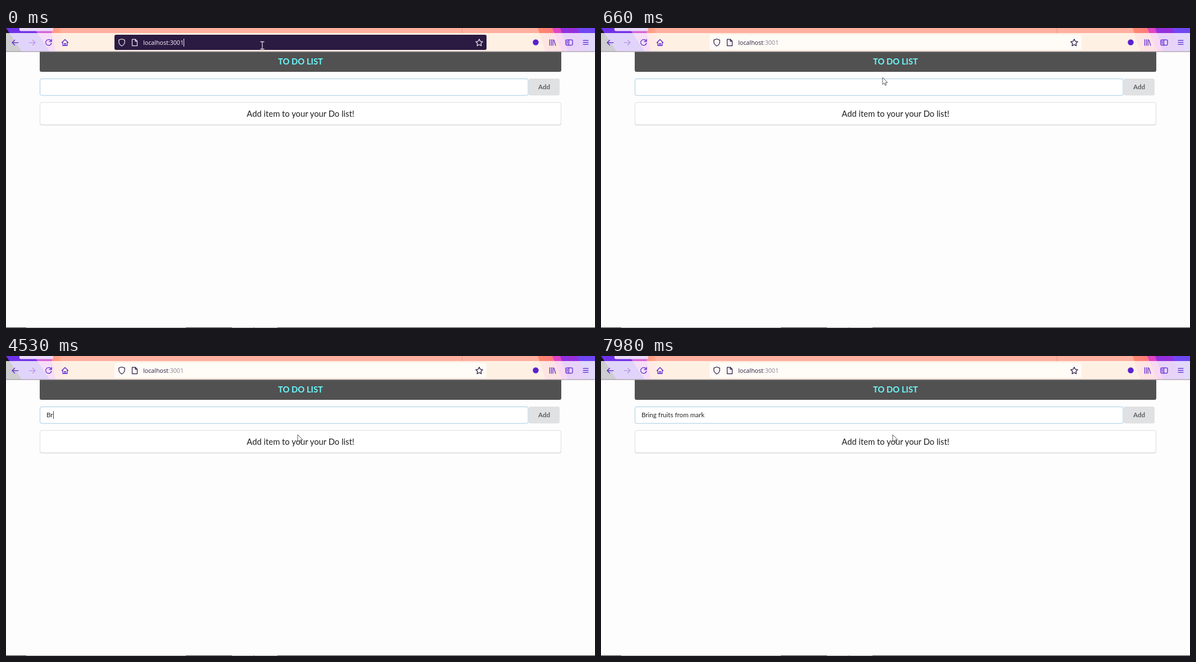
Write an HTML page that moves like this. It is 1048 by 534 pixels and loops after 8000 ms.

```html
<!DOCTYPE html>
<html lang="en">
<head>
<meta charset="utf-8">
<title>To do list</title>
<style>
  html, body { margin: 0; width: 100%; height: 100%; overflow: hidden; background: #fdfdfd; }
  svg { display: block; width: 1048px; height: 534px; font: 11.6px Lato, sans-serif; }
  text { white-space: pre; }
  .icon { fill: none; stroke: #5a22cf; stroke-width: 1.25; stroke-linecap: round; stroke-linejoin: round; }
  .big { font-size: 14.8px; }
  .bold { font-weight: 700; }
  .mid { text-anchor: middle; }
  .url { font: 10.7px "Open Sans", sans-serif; fill: #2b2040; }
  .port { fill: #8b8491; }
  #bar { fill: #fff; fill-opacity: .72; }
  #barIcons { stroke: #2b1b45; }
  .focused #bar { fill: #2b1a42; fill-opacity: 1; }
  .focused #barIcons { stroke: #e8e2ee; }
  .focused .url, .focused .port { fill: #fbfbfe; }
  #urlCaret, #status { visibility: hidden; }
  .focused #urlCaret, .loading #status { visibility: visible; }
  .loading #page { visibility: hidden; }
</style>
</head>
<body>
<svg id="stage" viewBox="0 0 1048 534">
  <defs>
    <linearGradient id="warm"><stop stop-color="#ff7f86"/><stop offset="1" stop-color="#ffb08a"/></linearGradient>
    <linearGradient id="hot"><stop stop-color="#ff8a6c"/><stop offset="1" stop-color="#f04fae"/></linearGradient>
  </defs>
  <rect width="1048" height="534" fill="#fdfdfd"/>

  <!-- Browser theme and toolbar -->
  <rect width="1048" height="9" fill="#ffb0a0"/>
  <rect y="9" width="1048" height="33" fill="#ffb780"/>
  <path d="M60 0H96L106 42H70Z" fill="url(#warm)"/>
  <path d="M0 0H80L88 42H0Z" fill="#d565d8"/>
  <path d="M0 0H50L78 42H0Z" fill="#7032e8"/>
  <path d="M0 0L28 42H0Z" fill="#17121f"/>
  <path d="M946 0H1048V42H960Z" fill="url(#hot)"/>
  <path d="M972 0H1048V42H990Z" fill="#e045c4"/>
  <path d="M986 0H1048V42H1000Z" fill="#9430dd"/>
  <path d="M1016 0H1048V42H1036Z" fill="#7048f2"/>
  <rect y="9" width="1048" height="33" fill="#fff" opacity=".79"/>
  <path d="M24 0H84V3Q84 5.500 81 5.500H27Q24 5.500 24 3Z" fill="#ead8fa"/>
  <path d="M811.500 0V9" stroke="#ef8f86"/>
  <path d="M0 42H1048" stroke="#96898f"/>

  <g class="icon">
    <path d="M22 26H11M15.500 21.500L11 26L15.500 30.500"/>
    <path d="M41 26H52M47.500 21.500L52 26L47.500 30.500" stroke="#b695ec"/>
    <path id="reload" d="M80.300 23A5.200 5.200 0 1 0 80.900 27M81 20V24H77"/>
    <path d="M99.500 26L105 20.500L110.500 26M101 25V31.300H109V25M103.700 31V27.500H106.300V31"/>
    <circle cx="942.500" cy="25.500" r="5.200" fill="#5a22cf" stroke="none"/>
    <path d="M967.500 20.500V31M970.500 20.500V31M973.300 20.500V31M975 21.500L977.800 31"/>
    <rect x="996" y="21" width="12" height="9.500" rx="1.500"/>
    <path d="M1001.500 21V30.500M998 23.500H999.500M998 25.700H999.500M998 28H999.500"/>
    <path d="M1027 22H1036M1027 25.500H1036M1027 29H1036"/>
  </g>

  <rect id="bar" x="193" y="12" width="662" height="27" rx="3"/>
  <g id="barIcons" class="icon">
    <path d="M206 19.500L211.200 21.300V25Q211 29.500 206 32Q201 29.500 200.800 25V21.300Z"/>
    <path d="M224.500 20H230L233.500 23.500V31.500H224.500ZM230 20V23.500H233.500"/>
    <path d="M842 19.800L843.900 23.700L848.200 24.300L845.100 27.300L845.800 31.600L842 29.500L838.200 31.600L838.900 27.300L835.800 24.300L840.100 23.700Z"/>
  </g>
  <text class="url" x="244" y="30">localhost<tspan class="port">:3001</tspan></text>
  <path id="urlCaret" d="M316.500 19V33" stroke="#fbfbfe"/>

  <g id="page">
    <path d="M60 42.500H988V75Q988 78 985 78H63Q60 78 60 75Z" fill="#515151"/>
    <text class="big bold mid" x="524" y="65.300" fill="#6cf8fb">TO DO LIST</text>
    <rect x="60.500" y="90.500" width="868.500" height="29.500" rx="3" fill="#fff" stroke="#a5cbe4"/>
    <rect x="930" y="90" width="55" height="30" rx="3" fill="#e0e1e2"/>
    <text class="bold mid" x="957.500" y="108.600" fill="#606162">Add</text>
    <rect x="60" y="133.500" width="928" height="40" rx="3" fill="#e3e3e4"/>
    <rect x="60.500" y="132.500" width="927" height="39.500" rx="3" fill="#fff" stroke="#dededf"/>
    <text class="big mid" x="524" y="157.500" fill="#1f1f1f">Add item to your your Do list!</text>
    <text id="entry" x="72" y="109" fill="#262626"></text>
    <path id="caret" d="M.5 98V112" stroke="#444"/>
  </g>

  <g id="status">
    <rect x="-1" y="516.500" width="215" height="18" fill="#f8f8f9" stroke="#e0e0e1"/>
    <text class="url" x="0" y="528.500" style="font-size:10px;fill:#55505c">localhost</text>
  </g>
  <path d="M0 533.500H1048" stroke="#3b383c"/>
  <path d="M36 533.500H320M402 533.500H441M442 533.500H483" stroke="#a9a7aa"/>

  <!-- Pointer -->
  <g id="pointer">
    <circle id="click" cx="-2" cy="-.5" r="9.800" fill="#fbf36b"/>
    <g id="beam" fill="none">
      <path id="halo" d="M-3.500 -6.500H3.500M0 -6.500V6.500M-3.500 6.500H3.500" stroke="#fff" stroke-width="2.600"/>
      <path id="stem" d="M-3.500 -6.500H3.500M0 -6.500V6.500M-3.500 6.500H3.500" stroke="#222" stroke-width="1.300"/>
    </g>
    <path id="arrow" d="M0 0V12.500L2.900 9.900L4.800 14.200L6.700 13.400L4.900 9.200H8.800Z" fill="#fff" stroke="#444" stroke-width=".9"/>
  </g>
</svg>
<script>
const LOOP = 8000;
const PHRASE = "Bring fruits from mark";
const KEY_TIMES = [
  4320, 4530, 4720, 4850, 4980, 5050,
  5780, 5910, 6040, 6250, 6320, 6440, 6580,
  6640, 6850, 6910, 6980, 7050,
  7260, 7390, 7650, 7780
];
const CARET_OFF = [[0, 1600], [2130, 2660], [3200, 3730], [4260, 4320], [5310, 5780], [7980, LOOP]];
// Pointer strokes: start, end, from, to; sampled once per tick
const STROKES = [
  [144, 870, [456, 36], [521, 110]],
  [870, 930, [521, 110], [519, 103]],
  [1924, 2600, [519, 103], [519, 140]]
];
const TICK = 66;

const el = Object.fromEntries([...document.querySelectorAll("[id]")].map(e => [e.id, e]));
const within = (t, a, b) => t >= a && t < b;
const show = (node, on) => node.setAttribute("visibility", on ? "inherit" : "hidden");
const ease = p => p * p * (3 - 2 * p);

function pointerAt(t) {
  if (t < 130) return [456, 31];
  let pos = STROKES[0][2];
  for (const [start, end, from, to] of STROKES) {
    if (t < start) break;
    const elapsed = Math.floor((t - start) / TICK) * TICK;
    const p = t >= end ? 1 : ease(elapsed / (end - start));
    pos = from.map((v, i) => Math.round(v + (to[i] - v) * p));
  }
  return pos;
}

function draw(t) {
  const loading = within(t, 70, 130);
  el.stage.setAttribute("class", (t < 130 ? "focused " : "") + (loading ? "loading" : ""));
  el.reload.setAttribute("transform", loading ? "translate(1 0) rotate(25 76 26)" : "");

  const typed = PHRASE.slice(0, KEY_TIMES.filter(k => k <= t).length);
  if (el.entry.textContent !== typed) el.entry.textContent = typed;
  const caretX = 72 + (typed ? Math.round(el.entry.getComputedTextLength()) : 0);
  el.caret.setAttribute("transform", `translate(${caretX} 0)`);
  show(el.caret, !CARET_OFF.some(([a, b]) => within(t, a, b)));

  const [x, y] = pointerAt(t);
  const beam = y < 42 || within(y, 90, 120);
  el.pointer.setAttribute("transform", `translate(${x} ${y})`);
  show(el.beam, beam);
  show(el.arrow, !beam);
  show(el.halo, t >= 130 && !within(t, 1600, 1730));
  el.stem.setAttribute("stroke", within(t, 0, 130) ? "#d8d4dc" : "#222");
  show(el.click, within(t, 1600, 1730));
}

const begin = performance.now();
function frame() {
  draw((performance.now() - begin) % LOOP);
  requestAnimationFrame(frame);
}
draw(0);
requestAnimationFrame(frame);
</script>
</body>
</html>
```
